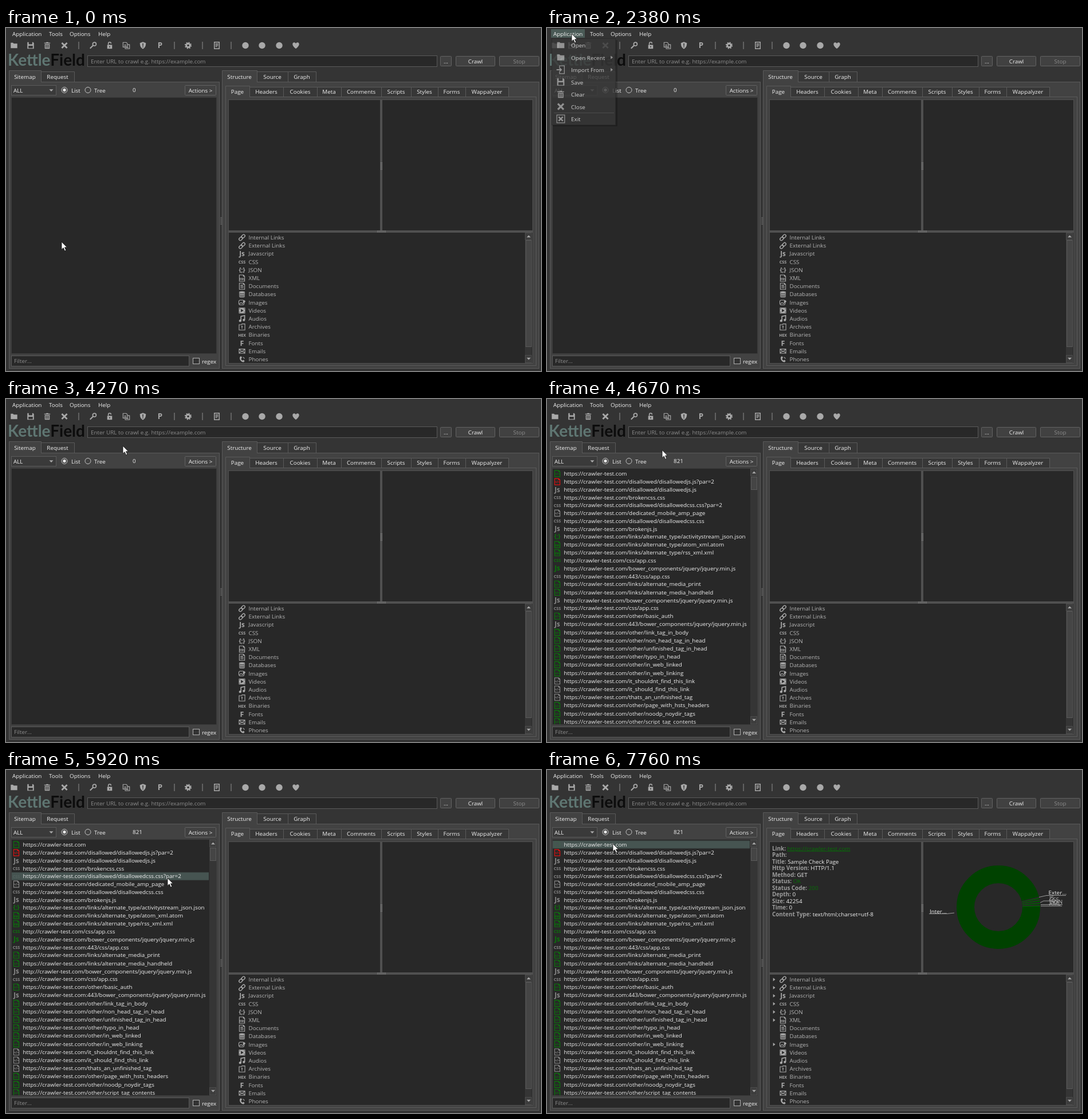
An HTML page for the animation above (8 s loop, 934 px wide and 600 px high).

```html
<!DOCTYPE html>
<html lang="en">
<head>
<meta charset="utf-8">
<title>Crawler window</title>
<style>
html, body { margin: 0; width: 100%; height: 100%; overflow: hidden; background: #343434; }
svg { display: block; }
text { font-family: "Open Sans", "Noto Sans", sans-serif; font-size: 9.85px; fill: #f0f0f0; white-space: pre; }
.m { text-anchor: middle; }
.dim { fill: #8c8c8c; }
.tree { fill: #b4b4b4; }
.b { font-weight: 700; fill: #9c9c9c; }
.green { fill: #067006; }
.logo { font: 700 28px Lato, sans-serif; }
.icon { fill: currentColor; color: #a9a9a9; }
.icon text { fill: currentColor; font-weight: 700; text-anchor: middle; }
.l { fill: none; stroke: currentColor; stroke-width: 1.2; }
</style>
</head>
<body>
<svg id="stage" width="934" height="600"></svg>
<script>
const PANE = '#424242', EDGE = '#5a5a5a', FIELD = '#282828';

const rect = (x, y, x2, y2, fill, stroke, extra = '') => stroke
  ? `<rect x="${x + .5}" y="${y + .5}" width="${x2 - x - 1}" height="${y2 - y - 1}" fill="${fill}" stroke="${stroke}" ${extra}/>`
  : `<rect x="${x}" y="${y}" width="${x2 - x}" height="${y2 - y}" fill="${fill}" ${extra}/>`;
const text = (x, y, s, cls = '') => `<text x="${x}" y="${y + 3.5}" class="${cls}">${s}</text>`;
const path = (d, extra = 'class="l"') => `<path d="${d}" ${extra}/>`;
const group = (cls, body) => `<g class="${cls}">${body}</g>`;
const glyph = (s, size, y) => `<text y="${y}" style="font-size:${size}px">${s}</text>`;
const sheet = path('M-5-6H2.500L5-3.500V6H-5zM2.500-6V-3.500H5');
const cross = path('M-4.800-4.800 4.800 4.800M4.800-4.800-4.800 4.800', 'class="l" style="stroke-width:3"');

// Every icon is centred on the origin, about 13 px wide.
const ICONS = {
  folder: path('M-6-5h4l1.500 1.500H6V5H-6z', ''),
  save: path('M-6-6H4.500L6-4.500V6H-6zM-3.500-6V-2H3V-6zM-4 .5V5H4V.5z', 'fill-rule="evenodd"'),
  trash: path('M-2-6H2V-5H5.500V-3.700H-5.500V-5H-2zM-4.500-2.700H4.500V6H-4.500zM-3-1.500V4.500H-1.800V-1.500zM-.6-1.500V4.500H.6V-1.500zM1.800-1.500V4.500H3V-1.500z', 'fill-rule="evenodd"'),
  close: cross,
  exit: path('M-6.500-6.500H6.500V6.500H-6.500z') + path('M-3.500-3.500 3.500 3.500M3.500-3.500-3.500 3.500', 'class="l" style="stroke-width:2.4"'),
  import: path('M-2-2V-6.500H6V6.500H-2V2.500') + path('M-7 0H1M-1.500-2.500 1 0-1.500 2.500', 'class="l" style="stroke-width:1.8"'),
  search: '<circle cx="2.500" cy="-2.500" r="3.200" class="l" style="stroke-width:1.800"/>' + path('M0 0-5.500 5.500', 'class="l" style="stroke-width:2"'),
  lock: path('M-4.500-1H4.500V6H-4.500zM-1 1.500V3.500H1V1.500z', 'fill-rule="evenodd"') + path('M-2.500-1V-3.500A2.500 2.500 0 0 1 2.500-3.500', 'class="l" style="stroke-width:1.6"'),
  pages: path('M-6-5.500H0L2-3.500V3H-6zM2-1.500H6V6H-2V3M-4-1H0M-4 1H0M0 4H4'),
  shield: path('M0-6.500 5.500-4.500C5.500 1 4 4 0 6.500-4 4-5.500 1-5.500-4.500zM-.8-4V1H.8V-4zM-.8 2V3.600H.8V2z', 'fill-rule="evenodd"'),
  p: glyph('P', 14, 5),
  gear: '<circle r="3.400" class="l" style="stroke-width:3"/><circle r="5.400" class="l" style="stroke-width:2;stroke-dasharray:2.120 2.120"/>',
  report: path('M-4.500-6H4.500V6H-4.500zM-2.500-3H2.500M-2.500-.5H2.500M-2.500 2H1', 'class="l" style="stroke-width:1.5"'),
  dot: '<circle r="6"/>',
  heart: path('M0 6C-9-.5-6-6-3-5.500-1.500-5.500-.5-4.500 0-3.500.5-4.500 1.500-5.500 3-5.500 6-6 9-.5 0 6z', ''),
  link: '<g transform="rotate(-45)" class="l" style="stroke-width:1.500"><rect x="-7" y="-2.500" width="7.500" height="5" rx="2.500"/><rect x="-.5" y="-2.500" width="7.500" height="5" rx="2.500"/></g>',
  js: glyph('Js', 12.5, 4.5),
  css: glyph('CSS', 7.8, 3),
  json: glyph('{;}', 11, 3.8),
  xml: sheet + glyph('XML', 4.8, 3.5),
  html: sheet + glyph('&lt;/&gt;', 6, 3),
  doc: sheet + path('M-3-2H2M-3 .5H3M-3 3H3'),
  db: path('M-5.500-4A5.500 2 0 0 1 5.500-4V4A5.500 2 0 0 1-5.500 4z', '') + path('M-5.500-2.500Q0 .5 5.500-2.500M-5.500.5Q0 3.500 5.500.5M-5.500 3Q0 6 5.500 3', 'fill="none" stroke="#282828"'),
  image: '<rect x="-6" y="-4.500" width="10" height="9" rx="2.500" class="l"/>' + path('M-5 3-2 0 1 2 4-1') + '<circle cx="4" cy="-2" r="2.200"/>',
  video: path('M-6-5.500H6V5.500H-6zM-2-3V3L3 0zM-5-4V-2.500H-4V-4zM-5 2.500V4H-4V2.500zM4-4V-2.500H5V-4zM4 2.500V4H5V2.500z', 'fill-rule="evenodd"'),
  audio: path('M-2 4V-4.500L5-6V2.500', 'class="l" style="stroke-width:1.800"') + '<circle cx="-3.500" cy="4" r="2.300"/><circle cx="3.500" cy="2.500" r="2.300"/>',
  archive: path('M-5.500-4H-1L0-5.500H5.500V6H-5.500zM0-2.500V3.500M-1.500-.5H1.500'),
  hex: glyph('HEX', 7.4, 3),
  font: glyph('F', 13.5, 5),
  mail: path('M-5.500-4H5.500V4H-5.500zL0 1 5.500-4M-5.500 4-1.500 0M5.500 4 1.500 0'),
  phone: path('M-3-5.500C-6-3-4 5 3.500 5.500L5 3 2.500 1.200 1 2.500C-1 1.500-1.700 0-1.700-1.500L0-2.500-1-5.500z', '') + path('M1.500-4Q4-3.500 4.500-1')
};
const icon = (name, x, y, color = '#a9a9a9', k = 1) =>
  `<g class="icon" style="color:${color}" transform="translate(${x} ${y}) scale(${k})">${ICONS[name]}</g>`;

const button = (x, y, x2, y2, label, cls = '') =>
  rect(x, y, x2, y2, '#414141', '#626262', 'rx="1"') + text((x + x2) / 2, (y + y2) / 2, label, 'm ' + cls);
const tri = (x, y, dir, r = 3.5) =>
  `<path d="M${-r}-1.800H${r}L0 2z" fill="#a9a9a9" transform="translate(${x} ${y}) rotate(${dir})"/>`;
const grip = (x, y, vertical) => [0, 2].map(d => vertical
  ? path(`M${x + d} ${y}v14`, 'stroke="#999" stroke-dasharray="1 1"')
  : path(`M${x} ${y + d}h15`, 'stroke="#999" stroke-dasharray="1 1"')).join('');

function tabs(x, y, h, items) {
  return items.map(([label, w], i) => {
    const y1 = i ? y + 2 : y, y2 = y + h + (i ? 0 : 1), left = x + .5, right = x + w + .5;
    x += w;
    return path(`M${left} ${y2}V${y1 + .5}H${right}V${y2}`, `fill="${i ? '#373737' : PANE}" stroke="${EDGE}"`) +
      text((left + right) / 2 - .5, y + h / 2 + 1, label, 'm');
  }).join('');
}
function scrollbar(x, y, y2, from, to) {
  return rect(x, y, x + 12, y2, '#353535') + rect(x, y, x + 12, y + 13, '#3d3d3d', '#4c4c4c') +
    rect(x, y2 - 14, x + 12, y2, '#3d3d3d', '#4c4c4c') + rect(x + 1, from, x + 12, to, '#454545', EDGE) +
    tri(x + 6.5, y + 6.5, 180) + tri(x + 6.5, y2 - 7.5, 0);
}

// Fixed window parts
const toolbarIcons = [['folder', 14], ['save', 43], ['trash', 72], ['close', 102], ['search', 152], ['lock', 181],
  ['pages', 210], ['shield', 239], ['p', 269], ['gear', 318], ['report', 368], ['dot', 418], ['dot', 447],
  ['dot', 477], ['heart', 506]];
const kinds = [['link', 'Internal Links'], ['link', 'External Links'], ['js', 'Javascript'], ['css', 'CSS'],
  ['json', 'JSON'], ['xml', 'XML'], ['doc', 'Documents'], ['db', 'Databases'], ['image', 'Images'],
  ['video', 'Videos'], ['audio', 'Audios'], ['archive', 'Archives'], ['hex', 'Binaries'], ['font', 'Fonts'],
  ['mail', 'Emails'], ['phone', 'Phones']];
const kindY = i => 366.5 + 14.2 * i;

const base =
  rect(0, 0, 934, 600, '#343434') + group('app', rect(7, 2, 66, 17, '#4a5a56')) +
  [[11, 'Application'], [75, 'Tools'], [111, 'Options'], [161, 'Help']].map(([x, s]) => text(x, 10, s)).join('') +
  toolbarIcons.map(([n, x]) => icon(n, x, 30.5, '#a9a9a9', .95)).join('') +
  [127, 294, 343, 393].map(x => rect(x - .7, 24, x + .7, 37, '#777')).join('') +
  `<text x="3" y="66" class="logo"><tspan fill="#5f7672">Kettle</tspan><tspan fill="#0c0c0c">Field</tspan></text>` +
  rect(142, 48, 753, 68, FIELD, EDGE) + text(148, 58.5, 'Enter URL to crawl e.g. https://example.com', 'dim') +
  button(758, 49, 778, 67, '...') + button(785, 49, 854, 67, 'Crawl') + button(861, 49, 931, 67, 'Stop', 'dim') +
  rect(5, 94, 373, 596, PANE, EDGE) + tabs(5, 74, 20, [['Sitemap', 56], ['Request', 58]]) +
  rect(9, 100, 88, 118, '#3a3a3a', EDGE) + text(13, 109.3, 'ALL') + tri(79, 109, 0) +
  `<g fill="none" stroke="#c8c8c8"><circle cx="102" cy="108.500" r="5"/><circle cx="143" cy="108.500" r="5"/></g>
   <circle cx="102" cy="108.500" r="2.700" fill="#e6e6e6"/>` +
  text(114, 109, 'List') + text(154, 109, 'Tree') + button(312, 100, 367, 118, 'Actions &gt;') +
  rect(9, 121, 368, 570, FIELD, '#3a3a3a') + rect(9, 573, 320, 592, FIELD, EDGE) + text(14, 582.5, 'Filter...', 'dim') +
  rect(326, 577, 338, 588, '#333', '#b0b0b0') + text(342, 583, 'regex') + grip(375, 331, true) +
  rect(377, 94, 931, 596, PANE, EDGE) + tabs(377, 74, 20, [['Structure', 61], ['Source', 54], ['Graph', 49]]) +
  rect(383, 120, 926, 591, PANE, EDGE) +
  tabs(383, 101, 19, [['Page', 42], ['Headers', 59], ['Cookies', 59], ['Meta', 42], ['Comments', 70],
    ['Scripts', 52], ['Styles', 47], ['Forms', 48], ['Wappalyzer', 75]]) +
  rect(388, 125, 920, 587, '#505050') + rect(389, 126, 653, 354, FIELD) + rect(657, 126, 919, 354, FIELD) +
  rect(389, 358, 919, 586, FIELD) + grip(654.5, 235, true) + grip(648, 355, false) +
  kinds.map(([n, s], i) => icon(n, 412, kindY(i), '#a9a9a9', .92) + text(423.5, kindY(i), s, 'tree')).join('') +
  scrollbar(906, 358, 586, 371, 558);

// Sitemap rows: icon, colour, path ("!" marks plain http)
const rows = `html g
html r /disallowed/disallowedjs.js?par=2
js n /disallowed/disallowedjs.js
css n /brokencss.css
css n /disallowed/disallowedcss.css?par=2
html n /dedicated_mobile_amp_page
css n /disallowed/disallowedcss.css
js n /brokenjs.js
json g /links/alternate_type/activitystream_json.json
xml g /links/alternate_type/atom_xml.atom
xml g /links/alternate_type/rss_xml.xml
css g !/css/app.css
js g /bower_components/jquery/jquery.min.js
css n :443/css/app.css
html g /links/alternate_media_print
html g /links/alternate_media_handheld
js n !/bower_components/jquery/jquery.min.js
css n /css/app.css
html g /other/basic_auth
js n :443/bower_components/jquery/jquery.min.js
html g /other/link_tag_in_body
html g /other/non_head_tag_in_head
html g /other/unfinished_tag_in_head
html g /other/typo_in_head
html g /other/in_web_linked
html g /other/in_web_linking
html n /it_shouldnt_find_this_link
html n /it_should_find_this_link
html n /thats_an_unfinished_tag
html g /other/page_with_hsts_headers
html g /other/noodp_noydir_tags
html g /other/script_tag_contents`.split('\n').map(s => s.split(' '));
const tint = { g: '#0b760b', r: '#e01010', n: '#8a8a8a' };
const rowY = [];
let rowTop = 123.3;
for (const [kind] of rows) {
  const h = kind === 'css' || kind === 'json' ? 13.3 : 14.2;
  rowY.push(rowTop + h / 2);
  rowTop += h;
}
const rowIcon = ([kind, c], i) => icon(kind, 18, rowY[i], tint[c], .92);
const rowText = ([, , p = ''], i) => text(29.5, rowY[i],
  (p[0] === '!' ? 'http' : 'https') + '://crawler-test.com' + p.replace('!', ''));
const inTwoParts = fn => {
  const all = rows.map(fn);
  return group('first', all.slice(0, 21).join('')) + group('rest', all.slice(21).join(''));
};
const sitemap = group('none', text(221, 108.5, '0')) + group('first', text(221, 108.5, '821')) +
  `<clipPath id="view"><path d="M10 122H367V568.500H10z"/></clipPath><g clip-path="url(#view)">` + inTwoParts(rowIcon) +
  group('row', rect(10, -6.8, 354, 6.8, '#4b5b57', '', 'opacity=".88"')) + inTwoParts(rowText) + '</g>' +
  group('rest', scrollbar(355, 122, 569, 136, 159));

// Application menu
const itemY = i => 30 + 21.5 * i;
const appMenu = group('menu',
  rect(10, 21, 123, 172, '#000', '', 'opacity=".25"') + rect(8, 18, 120, 170, '#383838', '#2b2b2b') +
  group('item', rect(17, -10, 119, 10, '#4a5a56')) +
  [['folder', 'Open'], ['folder', 'Open Recent'], ['import', 'Import From'], ['save', 'Save'], ['trash', 'Clear'],
    ['close', 'Close'], ['exit', 'Exit']].map(([n, s], i) =>
    icon(n, 24, itemY(i), '#a9a9a9', 1.05) + text(42, itemY(i) + .5, s)).join('') +
  tri(113, 51.5, -90, 3) + tri(113, 73, -90, 3) + rect(12, 148, 117, 149, '#555'));
const submenu = group('submenu',
  rect(119, 42, 232, 108, '#383838', '#2b2b2b') + group('recent', rect(120, 65, 231, 86, '#4a5a56')) +
  ['crawl_test.sspd', 'katana_test.sspd', 'sample.sspd'].map((s, i) => text(132, 53.5 + 21.5 * i, s)).join(''));

const dialog = group('dialog',
  `<g style="filter:drop-shadow(3px 4px 6px #0008)">${rect(360, 237, 575, 337, '#353535', '#a5c261')}</g>` +
  rect(361, 238, 574, 265, '#fff') + rect(367, 243, 382, 258, '#161616') +
  `<text x="386" y="254.500" style="fill:#111">Done!</text>` +
  path('M556.500 246.500l9 9m0-9l-9 9', 'stroke="#111"') +
  '<circle cx="384" cy="288.500" r="12.500" fill="#0078d7"/>' +
  rect(383, 286, 385, 296, '#fff') + rect(383, 281.5, 385, 283.7, '#fff') +
  text(415, 281, 'Project katana_test.sspd Is open!') + button(494, 308, 564, 326, 'OK'));

// Page details
const facts = [['Link', 'https://crawler-test.com', 'green" text-decoration="underline'], ['Path', ''],
  ['Title', 'Sample Check Page'], ['Http Version', 'HTTP/1.1'], ['Method', 'GET'], ['Status', 'OK', 'green'],
  ['Status Code', '200', 'green'], ['Depth', '0'], ['Size', '42254'], ['Time', '0'],
  ['Content Type', 'text/html;charset=utf-8']];
const spoke = (deg, color, w) =>
  `<path d="M42 0H73" stroke="${color}" stroke-width="${w}" transform="translate(788 240) rotate(${deg})"/>`;
const details = group('details',
  facts.map(([k, v, c = '']) => `<tspan class="b">${k}:</tspan> <tspan class="${c}">${v}</tspan>`)
    .map((s, i) => text(393, 137 + 11.5 * i, s)).join('') +
  '<circle cx="788" cy="240" r="57.500" fill="none" stroke="#004200" stroke-width="31"/>' +
  [-13.5, -10, -6.5, -3].map(a => spoke(a, '#282828', 2.6) + spoke(a + 1.3, '#006400', 1.2)).join('') +
  path('M667 251.500H698L711 250M859 222.500L872 219.500H906M861 232L867 229H890M862 235.500H900M862 238H899',
    'fill="none" stroke="#bbb" stroke-width=".8"') +
  text(668, 247, 'Inter...') + text(875.5, 214, 'Exter...') +
  ['JS', 'CSS', 'JSON', 'XML'].map((s, i) => text(877, 223 + 3.5 * i, s, 'tree')).join('') +
  [0, 1, 2, 3, 4, 5, 8].map(i => tri(396.5, kindY(i), -90, 3)).join(''));

const cursor = group('cursor',
  path('M0 0V13.500L3.200 10.600 5.500 16 7.800 15 5.500 9.800H9.600z', 'fill="#fff" stroke="#111" stroke-width=".8"'));

document.getElementById('stage').innerHTML = base + sitemap + details + appMenu + submenu + dialog + cursor;

// Timeline: keys are [ms, css, easing]
const LOOP = 8000;
let sheetText = '';
function addKeys(cls, keys) {
  const last = keys[keys.length - 1];
  sheetText += `.${cls}{animation:k-${cls} ${LOOP}ms infinite}@keyframes k-${cls}{` +
    [...keys, [LOOP, last[1]]].map(([ms, rule, ease = 'step-end']) =>
      `${ms * 100 / LOOP}%{${rule};animation-timing-function:${ease}}`).join('') + '}';
}
const fade = (cls, ...keys) => addKeys(cls, keys.map(([ms, v]) => [ms, `opacity:${v}`]));
const at = (x, y) => `transform:translate(${x}px,${y}px)`;

fade('app', [0, 0], [2240, 1], [3760, 0]);
fade('menu', [0, 0], [2380, .82], [2500, 1], [3760, 0]);
fade('submenu', [0, 0], [3186, .82], [3327, 1], [3760, 0]);
fade('recent', [0, 0], [3469, 1]);
fade('none', [0, 1], [4400, 0]);
fade('first', [0, 0], [4400, 1]);
fade('rest', [0, 0], [4670, 1]);
fade('dialog', [0, 0], [4820, 1], [5650, 0]);
fade('details', [0, 0], [7760, 1]);
addKeys('item', [[0, at(0, -40)], [2620, at(0, itemY(0))], [2903, at(0, itemY(1))]]);
addKeys('row', [[0, at(0, -40)], [5920, at(0, rowY[4])], [6450, at(0, rowY[3])], [6600, at(0, rowY[1])], [7200, at(0, rowY[0])]]);

// Pointer moves: first jump, last jump, number of jumps, end point
let here = at(97, 374);
const moves = [[0, here]];
for (const [from, to, n, x, y] of [
  [160, 550, 4, 81, 300], [830, 1220, 4, 67, 131], [1530, 2240, 6, 43, 10], [2620, 2903, 3, 62, 50],
  [3044, 3327, 3, 150, 56], [3469, 3610, 2, 204, 82], [4670, 4980, 3, 195, 104], [5110, 5370, 3, 528, 316],
  [5650, 5920, 3, 282, 189], [6450, 6600, 2, 120, 147], [6920, 6920, 1, 77, 143], [7060, 7480, 4, 115, 129]]) {
  if (n > 1) moves.push([from, here, `steps(${n - 1},jump-both)`]);
  moves.push([to, here = at(x, y)]);
}
addKeys('cursor', moves);
document.head.appendChild(document.createElement('style')).textContent = sheetText;
</script>
</body>
</html>
```
